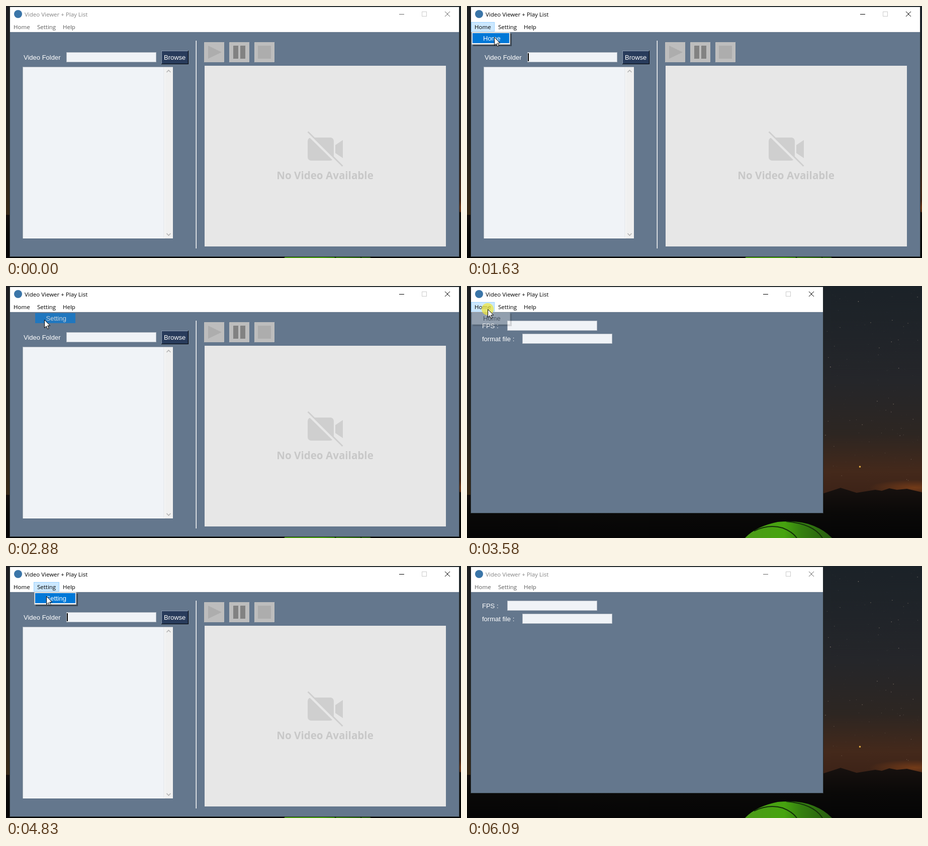
An HTML page for the animation above (6.14 s loop, 905 by 502 pixels).

```html
<!DOCTYPE html>
<html lang="en">
<head>
<meta charset="utf-8">
<title>Video viewer demo</title>
<style>
  html, body { margin: 0; width: 100%; height: 100%; overflow: hidden; background: #0b0b0c; }
  svg { display: block; }
  text { white-space: pre; }
  .ui { font: 11.5px "Open Sans", "Noto Sans", sans-serif; fill: #000; }
  .form { font: 13px "Liberation Sans", Arial, sans-serif; fill: #fff; }
  .notice { font: bold 20.6px "Open Sans", "Noto Sans", sans-serif; fill: #c8c8c8; text-anchor: middle; }
  .crisp, pattern { shape-rendering: crispEdges; }
  .field { fill: #f0f3f7; stroke: #b4bbc4; shape-rendering: crispEdges; }
  .chev { fill: none; stroke: #b4b4b4; stroke-width: 1.6; }
  .sys { fill: none; stroke: #000; }
  .off .ui { fill: #5e5e5e; }
  .off .title { fill: #858585; }
  .off .sys { stroke: #666; }
  #win .max { stroke: #ccc; }
  .off .max { stroke: #e6e6e6; }
</style>
</head>
<body>
<svg width="905" height="502" viewBox="0 0 905 502">
  <defs>
    <linearGradient id="sky" x2="0" y2="1">
      <stop offset="0" stop-color="#1b2228"/>
      <stop offset=".45" stop-color="#25262a"/>
      <stop offset=".7" stop-color="#2d2622"/>
      <stop offset=".88" stop-color="#44291b"/>
      <stop offset="1" stop-color="#3c2217"/>
    </linearGradient>
    <linearGradient id="dusk" x2="0" y2="1">
      <stop offset="0" stop-color="#1c1d20"/>
      <stop offset=".6" stop-color="#232220"/>
      <stop offset="1" stop-color="#3a2a17"/>
    </linearGradient>
    <radialGradient id="glow">
      <stop offset="0" stop-color="#8a4519" stop-opacity=".7"/>
      <stop offset="1" stop-color="#8a4519" stop-opacity="0"/>
    </radialGradient>
    <linearGradient id="ground" x2="0" y2="1">
      <stop offset="0" stop-color="#17110f"/>
      <stop offset=".5" stop-color="#0a0908"/>
      <stop offset="1" stop-color="#050505"/>
    </linearGradient>
    <linearGradient id="tent">
      <stop offset="0" stop-color="#4c9a18"/>
      <stop offset=".45" stop-color="#46a40f"/>
      <stop offset=".65" stop-color="#357f10"/>
      <stop offset="1" stop-color="#275c10"/>
    </linearGradient>
  </defs>

  <g id="wallpaper">
    <rect width="905" height="420" fill="url(#sky)"/>
    <rect width="8" height="418" fill="url(#dusk)"/>
    <ellipse cx="890" cy="402" rx="90" ry="16" fill="url(#glow)"/>
    <g id="stars"></g>
    <path fill="url(#ground)" d="M0 416H700L725 408 743 402 775 412 812 406 825 408 840 403 855 406 875 404 905 411V502H0z"/>
    <path fill="url(#tent)" d="M553 502Q574 479 618 470Q662 466 690 478Q712 487 726 502z"/>
    <path fill="none" stroke="#14300a" stroke-width="2" d="M571 488Q600 474 628 482Q648 490 656 502M635 469Q690 474 707 502"/>
  </g>

  <g id="win">
    <rect id="edge" class="crisp" x="7" y="1" fill="#272e30"/>
    <rect id="body" class="crisp" x="8" y="52" fill="#64778d"/>
    <rect id="bar" class="crisp" x="8" y="2" height="49" fill="#fff"/>
    <rect id="rule" class="crisp" x="8" y="51" height="1" fill="#f0f0f0"/>
    <circle cx="24" cy="16" r="8" fill="#3a75a8"/>
    <text class="ui title" x="37" y="21">Video Viewer + Play List</text>
    <g id="sysButtons">
      <path class="sys crisp" d="M782 16.5h10"/>
      <path class="sys max crisp" d="M827.5 11.5h9v9h-9z"/>
      <path class="sys" d="M873 11l10 10M883 11l-10 10"/>
    </g>
    <rect id="tab" class="crisp" y="32.5" height="18" fill="#cce8ff" stroke="#99d1ff"/>
    <text class="ui" x="15" y="46">Home</text>
    <text class="ui" x="62" y="46">Setting</text>
    <text class="ui" x="113" y="46">Help</text>
  </g>

  <g id="viewer">
    <text class="form" x="35" y="107">Video Folder</text>
    <rect class="field" x="120.5" y="92.5" width="178" height="19"/>
    <rect id="caret" class="crisp" x="121" y="94" width="2" height="16"/>
    <g class="crisp">
      <path fill="#000" d="M309 89h54v27h-54z"/>
      <path fill="#8b9ab0" d="M309 89h53v26h-53z"/>
      <path fill="#283b5b" d="M310 90h52v25h-52z"/>
    </g>
    <text class="form" x="314" y="107">Browse</text>
    <g class="crisp">
      <path fill="#a9b1ba" d="M33 121h299v342h-299z"/>
      <path fill="#fff" d="M34 122h298v341h-298z"/>
      <path fill="#f0f3f7" d="M34 122h281v340h-281z"/>
      <path fill="#f0f0f0" d="M316 122h16v341h-16z"/>
      <path fill="#dcdfe2" d="M314 122h1v340h-1z"/>
      <path fill="#a9b1ba" d="M377 69h1v414h-1z"/>
      <path fill="#fff" d="M378 69h1v414h-1z"/>
    </g>
    <path class="chev" d="M319.5 132l4-4 4 4M319.5 453l4 4 4-4"/>
    <path fill="url(#mesh)" d="M394 72h40v40h-40zM444 72h40v40h-40zM494 72h40v40h-40z"/>
    <path fill="url(#meshMid)" d="M402 79l27 13-27 13zM501 79h26v26h-26z"/>
    <path fill="url(#meshDark)" d="M452 79h10v26h-10zM466 79h10v26h-10z"/>
    <path class="crisp" fill="#e7e7e7" d="M395 119h480v360h-480z"/>
    <g fill="#cfcfcf">
      <rect x="600" y="262" width="52" height="46" rx="7"/>
      <path d="M655 277l15-10v36l-15-10z"/>
      <path d="M599 253l70 69" stroke="#e7e7e7" stroke-width="6"/>
      <path d="M600.5 250.5l69 68.5" stroke="#cfcfcf" stroke-width="2.8"/>
    </g>
    <text class="notice" x="634.5" y="344.5">No Video Available</text>
  </g>

  <g id="settings">
    <text class="form" x="30" y="84">FPS :</text>
    <rect class="field" x="80.5" y="69.5" width="178" height="19"/>
    <text class="form" x="30" y="110">format file :</text>
    <rect class="field" x="110.5" y="95.5" width="178" height="19"/>
  </g>

  <g id="popup">
    <g id="frame" class="crisp">
      <rect id="shade" y="55" height="25" fill="#000" opacity=".4"/>
      <rect id="rim" y="52" height="25" fill="#b8b8b8"/>
      <rect id="sheet" y="53" height="23" fill="#f4f4f4"/>
    </g>
    <rect id="item" class="crisp" y="54" height="20" fill="#0078d7"/>
    <text id="label" class="form" y="69"></text>
  </g>

  <circle id="click" r="12" fill="#f0e63c" opacity=".72"/>
  <path id="cursor" fill="#fff" stroke="#000" stroke-linejoin="round" d="M.5.5V16.5L4.2 13 6.8 18.7 9.2 17.6 6.7 12H11.7z"/>
</svg>

<script>
const LOOP = 6140, STEP = 77.8;
const ENTER = 70, FOCUS = 1160, LEAVE = 5760, BLUR = 6010;
const $ = id => document.getElementById(id);
const show = (el, on) => { el.style.display = on ? '' : 'none'; };
const set = (el, attrs) => { for (const k in attrs) el.setAttribute(k, attrs[k]); };
const within = (t, from, span) => t >= from && t < from + span;

const menus = {
  Home: { x: 8, width: 46, popup: 77, text: 32 },
  Setting: { x: 55, width: 50, popup: 84, text: 79.5 }
};
// Each visit presses a menu, then chooses its only item
const visits = [
  { menu: 'Home', press: FOCUS, choose: 1710, tab: [40, 45], item: [54, 62] },
  { menu: 'Setting', press: 2250, choose: 2795, tab: [74, 46], item: [76, 67] },
  { menu: 'Home', press: 3495, choose: 4035, tab: [41, 46], item: [43, 67] },
  { menu: 'Setting', press: 4575, choose: 5060, tab: [78, 45], item: [80, 60] }
];

// Pointer moves: start, end, destination
const entry = [441, 391];
const moves = [
  [ENTER, 630, [38, 44]],
  [630, 850, [88, 50]],
  ...visits.flatMap(v => [
    [v.press - 310, v.press - 20, v.tab],
    [v.press + 100, (v.press + v.choose) / 2, v.item]
  ]),
  [5160, 5700, [812, 485]]
];

function pointerAt(t) {
  const held = Math.floor((t + 8) / STEP) * STEP;
  let pos = entry;
  for (const [from, to, goal] of moves) {
    const k = Math.min(1, Math.max(0, (held - from) / (to - from)));
    const eased = k * (2 - k);
    pos = pos.map((p, i) => p + (goal[i] - p) * eased);
  }
  return pos.map(Math.round);
}

// The window is rebuilt empty, then filled, when another page is chosen
function pageAt(t) {
  let page = 'Home', filled = true;
  for (const v of visits) {
    if (t < v.choose + 155) break;
    filled = v.menu === page || t >= v.choose + 230;
    page = v.menu;
  }
  return { page, filled };
}

function drawWindow(t) {
  const { page, filled } = pageAt(t);
  const [width, height] = page === 'Home' ? [893, 447] : [700, 400];
  set($('edge'), { width: width + 2, height: height + 52 });
  set($('body'), { width, height });
  set($('bar'), { width });
  set($('rule'), { width });
  set($('sysButtons'), { transform: `translate(${width - 893} 0)` });
  $('win').classList.toggle('off', t < FOCUS || t >= BLUR);
  show($('viewer'), filled && page === 'Home');
  show($('settings'), filled && page === 'Setting');
  const blink = t - FOCUS - 65;
  show($('caret'), blink >= 0 && blink % 900 < 600);
}

function drawMenu(t, pointerY) {
  const v = visits.find(v => within(t, v.press, v.choose + 170 - v.press));
  const leaving = v && t >= v.choose + 80;
  show($('tab'), v && !leaving);
  show($('popup'), v && t >= v.press + 80);
  if (!v) return;
  const { x, width, popup, text } = menus[v.menu];
  const over = pointerY >= 54;
  set($('tab'), { x: x + .5, width });
  set($('rim'), { x: x + 1, width: popup });
  set($('sheet'), { x: x + 2, width: popup - 2 });
  set($('shade'), { x: x + 4, width: popup });
  set($('item'), { x: x + 3, width: popup - 4 });
  set($('label'), { x: text });
  $('label').textContent = v.menu;
  $('label').style.fill = over ? '#fff' : '#000';
  show($('frame'), !leaving);
  show($('item'), over);
  set($('popup'), { opacity: leaving ? .68 : t < v.press + 150 ? .32 : 1 });
}

function drawPointer(t, [x, y]) {
  const transform = `translate(${x} ${y})`;
  set($('cursor'), { transform });
  set($('click'), { transform });
  show($('cursor'), t >= ENTER && t < LEAVE);
  show($('click'), visits.some(v => within(t, v.press, 150) || within(t, v.choose, 80)));
}

function addMesh(id, light, dark) {
  document.querySelector('defs').insertAdjacentHTML('beforeend',
    `<pattern id="${id}" width="2" height="2" patternUnits="userSpaceOnUse">
      <path fill="${light}" d="M0 0h2v2h-2z"/>
      <path fill="${dark}" d="M0 0h1v1h-1zM1 1h1v1h-1z"/></pattern>`);
}

function addStars() {
  let seed = 7;
  const rnd = () => (seed = seed * 16807 % 2147483647) / 2147483647;
  const dot = (x, y, r, fill, opacity) =>
    `<circle cx="${x}" cy="${y}" r="${r}" fill="${fill}" opacity="${opacity}"/>`;
  let out = dot(781.5, 360, 1.8, '#e8b040', 1);
  for (let i = 0; i < 170; i++) {
    const glint = rnd() ** 6;
    out += dot(708 + rnd() * 197, rnd() * 390, .45 + glint * .4, '#b5a594', .15 + glint * .6);
  }
  $('stars').innerHTML = out;
}

function draw(now) {
  const t = now % LOOP, pointer = pointerAt(t);
  drawWindow(t);
  drawMenu(t, pointer[1]);
  drawPointer(t, pointer);
}

addMesh('mesh', '#f6f6f6', '#848484');
addMesh('meshMid', '#eee', '#6c6c6c');
addMesh('meshDark', '#d8d8d8', '#2c2c2c');
addStars();
const start = performance.now();
const tick = now => { draw(Math.max(0, now - start)); requestAnimationFrame(tick); };
draw(0);
requestAnimationFrame(tick);
</script>
</body>
</html>
```
